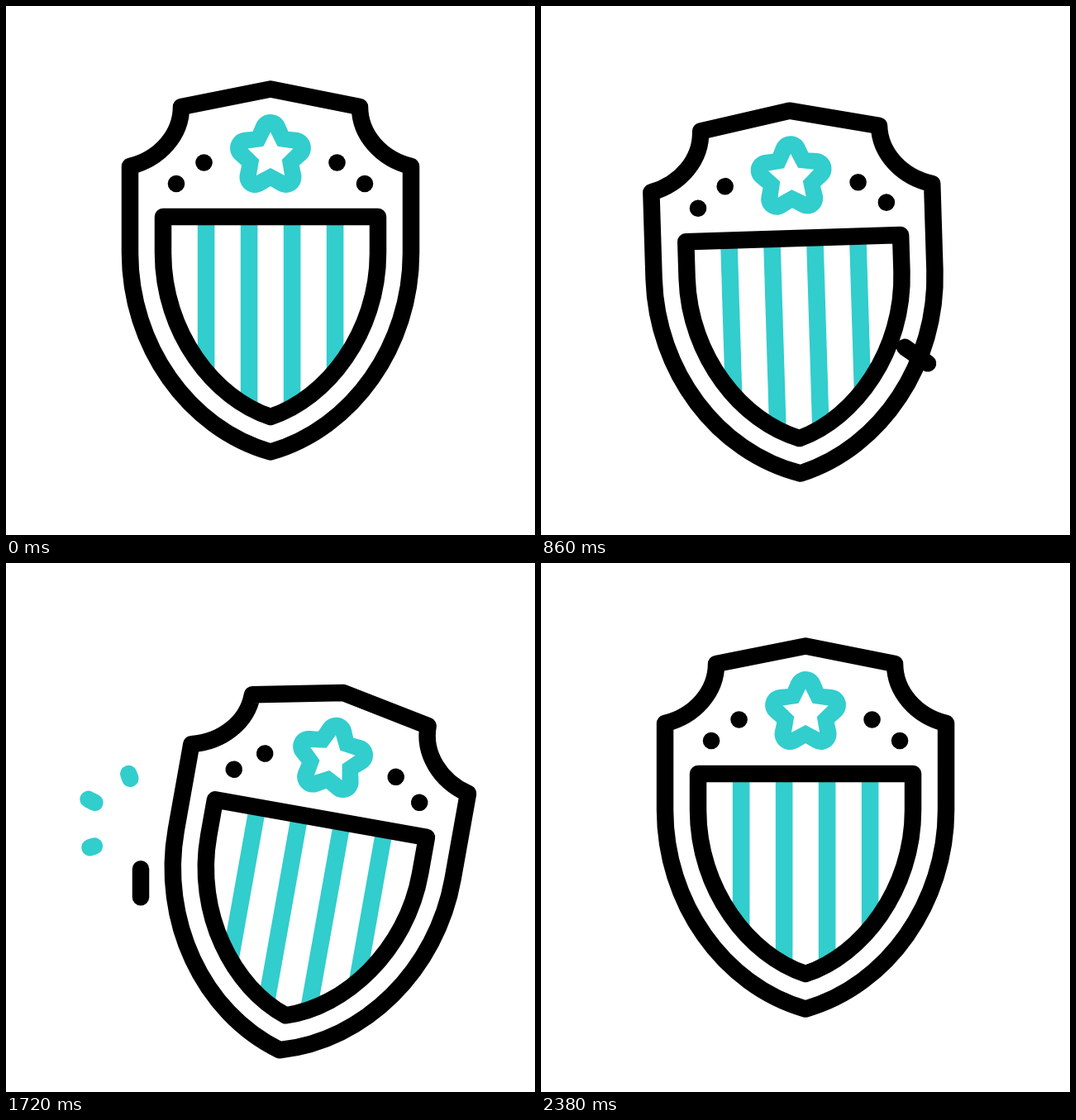
An HTML page with a canvas that plays this animation: 640x640 px, repeating every 2400 ms.

```html
<!DOCTYPE html>
<html lang="en">
<head>
<meta charset="utf-8">
<title>Shield</title>
<style>
  html, body { margin: 0; width: 100%; height: 100%; overflow: hidden; background: #fff; }
  canvas { display: block; width: 640px; height: 640px; }
</style>
</head>
<body>
<canvas id="stage" width="640" height="640"></canvas>
<script>
const ctx = document.getElementById('stage').getContext('2d');
const LOOP = 2400;
const TEAL = '#32cdcd';

const outline = new Path2D(
  'M320 100.5 L428 122 C428 156 454 185 490 194 V299 C490 410 420 511 320 539.5 ' +
  'C220 511 150 410 150 299 V194 C186 185 212 156 212 122 Z');
const panel = new Path2D(
  'M190 255 H450 V299 C450 395 388 475 320 497 C252 475 190 395 190 299 Z');

// Shield poses: offset of the centre and tilt in degrees.
const poses = [
  { at: 0, x: 0, y: 0, tilt: 0 },
  { at: 480, x: 16.8, y: 33.9, tilt: 6.45 },
  { at: 1240, x: -41.4, y: 18.6, tilt: -9.72 },
  { at: 1900, x: 54.5, y: 55, tilt: 11.2 },
  { at: LOOP, x: 0, y: 0, tilt: 0 }
];

// Each stick hits with its tip at (x, y); side is the direction its tail points.
const hits = [
  { at: 229, x: 186, y: 401, side: -1, slope: 40, hub: [140, 417] },
  { at: 862, x: 439, y: 412, side: 1, slope: 35, hub: [486, 424] },
  { at: 1584, x: 163, y: 302, side: -1, slope: 45, hub: [172, 322] }
];

// Spark rays: direction in degrees above the outward horizontal, start, length.
const rays = [[70.5, 50, 21], [26.5, 50, 31], [-17.5, 54, 20]];

const STICK = 34, SPEED = 1.4, FALL = 310, SPARK = 160;

const rad = deg => deg * Math.PI / 180;
const clamp = v => Math.max(0, Math.min(1, v));
const mix = (a, b, k) => a + (b - a) * k;

// Cubic bezier timing (.85, 0, .15, 1), solved by bisection.
function ease(u) {
  let lo = 0, hi = 1;
  for (let i = 0; i < 24; i++) {
    const s = (lo + hi) / 2, r = 1 - s;
    if (2.55 * r * r * s + 0.45 * r * s * s + s * s * s < u) lo = s; else hi = s;
  }
  return lo * lo * (3 - 2 * lo);
}

function poseAt(t) {
  const i = poses.findIndex((p, n) => n > 0 && t <= p.at);
  const a = poses[i - 1], b = poses[i];
  const k = ease((t - a.at) / (b.at - a.at));
  return { x: mix(a.x, b.x, k), y: mix(a.y, b.y, k), tilt: mix(a.tilt, b.tilt, k) };
}

function line(x1, y1, x2, y2) {
  ctx.beginPath();
  ctx.moveTo(x1, y1);
  ctx.lineTo(x2, y2);
  ctx.stroke();
}

function starPath(outer, inner) {
  ctx.beginPath();
  for (let i = 0; i < 10; i++) {
    const r = i % 2 ? inner : outer, a = rad(i * 36 - 90);
    ctx.lineTo(320 + r * Math.cos(a), 181.5 + r * Math.sin(a));
  }
  ctx.closePath();
}

function drawStar() {
  ctx.fillStyle = ctx.strokeStyle = TEAL;
  ctx.lineWidth = 38;
  starPath(31.5, 14.5);
  ctx.fill();
  ctx.stroke();
  ctx.fillStyle = '#fff';
  starPath(29, 14.5);
  ctx.fill();
}

function drawShield(t) {
  const { x, y, tilt } = poseAt(t);
  ctx.save();
  ctx.translate(320 + x, 320 + y);
  ctx.rotate(rad(tilt));
  ctx.translate(-320, -320);

  ctx.save();
  ctx.clip(panel);
  ctx.fillStyle = TEAL;
  for (let i = 0; i < 4; i++) ctx.fillRect(231.8 + i * 52, 255, 20.6, 245);
  ctx.restore();

  drawStar();

  ctx.fillStyle = ctx.strokeStyle = '#000';
  ctx.lineWidth = 20.5;
  ctx.stroke(outline);
  ctx.stroke(panel);
  for (const side of [-1, 1]) {
    for (const [dx, cy] of [[80.5, 189.5], [114, 215]]) {
      ctx.beginPath();
      ctx.arc(320 + side * dx, cy, 10.3, 0, 2 * Math.PI);
      ctx.fill();
    }
  }
  ctx.restore();
}

function drawSparks({ side, hub: [hx, hy] }, age) {
  const u = age / SPARK;
  if (u <= 0 || u >= 1) return;
  const head = clamp(u / 0.4), tail = clamp((u - 0.5) / 0.5);
  ctx.strokeStyle = TEAL;
  for (const [angle, start, length] of rays) {
    const cx = side * Math.cos(rad(angle)), cy = -Math.sin(rad(angle));
    const from = start + length * tail, to = start + length * head;
    line(hx + cx * from, hy + cy * from, hx + cx * to, hy + cy * to);
  }
}

function drawStick({ x, y, side, slope }, age) {
  if (age < -330 || age > FALL + 20) return;
  let angle = rad(slope);
  if (age < 0) {
    const away = -age * SPEED;
    x += side * away * Math.cos(angle);
    y += away * Math.sin(angle);
  } else {
    angle = rad(mix(slope, 90, clamp(age / 65)));
    y += (652 - y) * (age / FALL) ** 2;
  }
  ctx.strokeStyle = '#000';
  line(x, y, x + side * STICK * Math.cos(angle), y + STICK * Math.sin(angle));
}

function draw(t) {
  ctx.fillStyle = '#fff';
  ctx.fillRect(0, 0, 640, 640);
  ctx.lineCap = ctx.lineJoin = 'round';
  drawShield(t);
  ctx.lineWidth = 20.5;
  for (const hit of hits) {
    drawSparks(hit, t - hit.at);
    drawStick(hit, t - hit.at);
  }
}

const began = performance.now();
function tick() {
  draw((performance.now() - began) % LOOP);
  requestAnimationFrame(tick);
}
tick();
</script>
</body>
</html>
```
